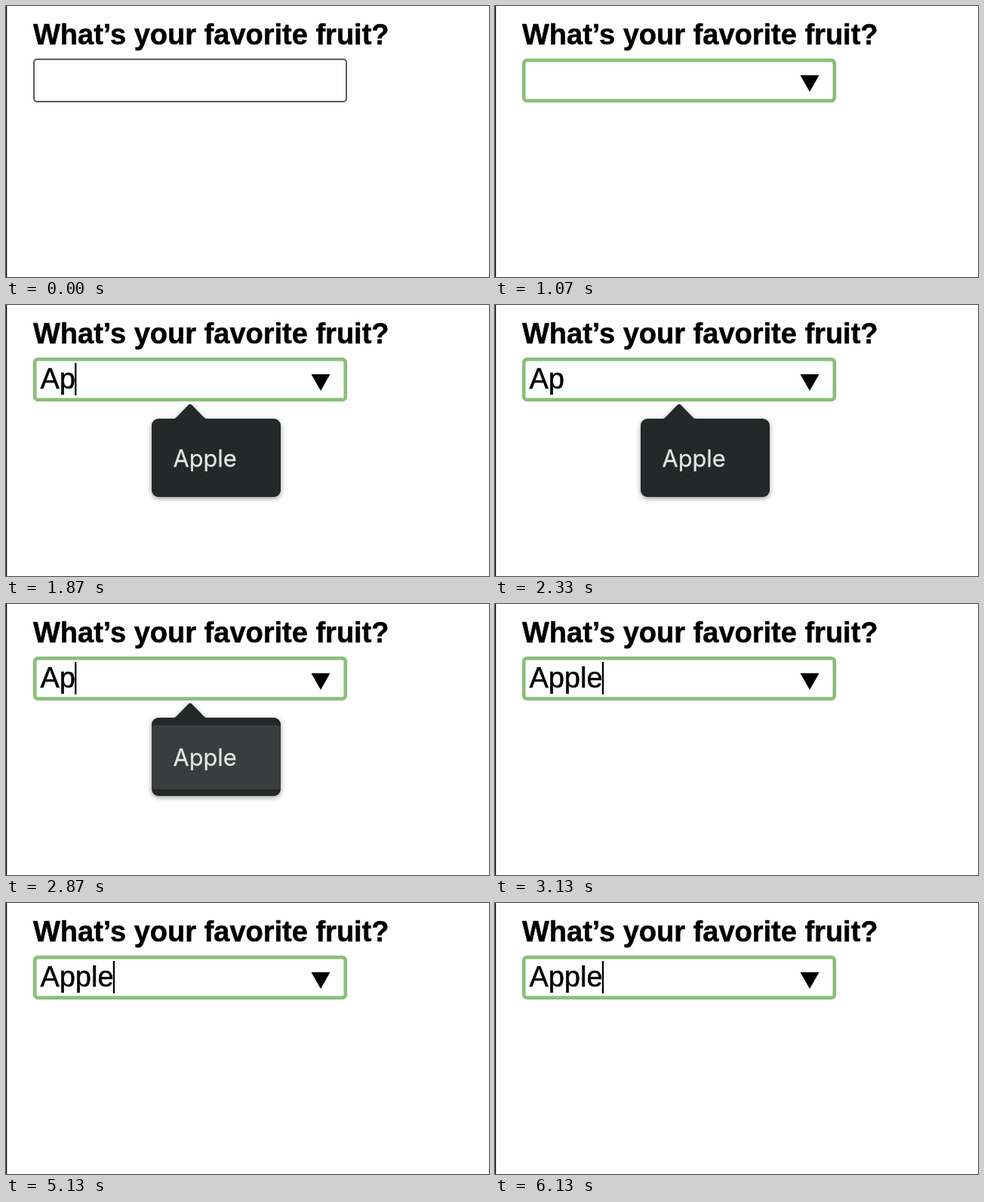
These frames come from a looping animation (640 by 360 pixels, 6.67 s). An HTML page:

```html
<!DOCTYPE html>
<html lang="en">
<head>
<meta charset="utf-8">
<title>Fruit picker</title>
<style>
  html, body { margin: 0; width: 100%; height: 100%; overflow: hidden; background: #fefefe; }
  svg { display: block; width: 640px; height: 360px; }
  text { font-family: "Liberation Sans", Arial, sans-serif; font-size: 38px; stroke: #000; stroke-width: .5px; }
  .title { font-weight: bold; }
  .option { font-family: Inter, sans-serif; font-size: 30.7px; fill: #e3e4e4; stroke: #e3e4e4; stroke-width: .3px; }
  #popup { filter: drop-shadow(0 2px 3px rgba(0, 0, 0, .4)); }
</style>
</head>
<body>
<svg viewBox="0 0 640 360">
  <rect width="1.2" height="360"/>
  <text class="title" x="36" y="51.2">What’s your favorite fruit?</text>
  <rect id="idle" x="37" y="70.8" width="414" height="56.2" rx="4" fill="#fefefe" stroke="#555" stroke-width="1.9"/>
  <g id="focus">
    <rect x="38.2" y="72.2" width="411.600" height="53.600" rx="4" fill="#fefefe" stroke="#8abf78" stroke-width="4.700"/>
    <path d="M404.500 92H429.500L417 114Z"/>
    <text id="value" x="45.400" y="111.400"></text>
    <rect id="caret" y="77" width="2.300" height="43"/>
  </g>
  <g id="popup" fill="#242829">
    <path d="M221 152Q224 151 226 149L241.500 133Q244 130.500 246.500 133L262 149Q264 151 267 152Z"/>
    <rect id="panel" x="193" y="151" rx="9"/>
    <rect id="highlight" x="193" y="161" width="171" height="85" fill="#393d3e"/>
    <text class="option" x="221.500" y="215">Apple</text>
    <text class="option" id="second" x="221.500" y="301">Orange</text>
  </g>
</svg>
<script>
const LOOP = 6670;
const $ = id => document.getElementById(id);

// Each step: start in ms, and what changes from then on.
const steps = [
  [0, { focus: false, text: "", caret: false, options: 0, highlight: false }],
  [600, { focus: true, caret: true }],
  [1070, { caret: false }],
  [1600, { text: "A", caret: true, options: 2 }],
  [1870, { text: "Ap", options: 1 }],
  [2330, { caret: false }],
  [2670, { highlight: true }],
  [2870, { caret: true }],
  [3130, { text: "Apple", options: 0, highlight: false }]
];
for (let start = 3670; start < LOOP; start += 1000) {
  steps.push([start, { caret: false }], [start + 460, { caret: true }]);
}

const show = (id, on) => $(id).style.display = on ? "" : "none";

function draw(now) {
  const time = now % LOOP;
  const state = Object.assign({}, ...steps.filter(([start]) => start <= time).map(step => step[1]));
  show("idle", !state.focus);
  show("focus", state.focus);
  show("caret", state.caret);
  show("popup", state.options > 0);
  show("second", state.options > 1);
  show("highlight", state.highlight);
  $("value").textContent = state.text;
  const width = state.text ? $("value").getComputedTextLength() : 0;
  $("caret").setAttribute("x", 44.6 + width);
  $("panel").setAttribute("width", state.options > 1 ? 199.5 : 171);
  $("panel").setAttribute("height", state.options > 1 ? 190 : 104);
  requestAnimationFrame(tick);
}

const origin = performance.now();
const tick = () => draw(performance.now() - origin);
tick();
</script>
</body>
</html>
```
